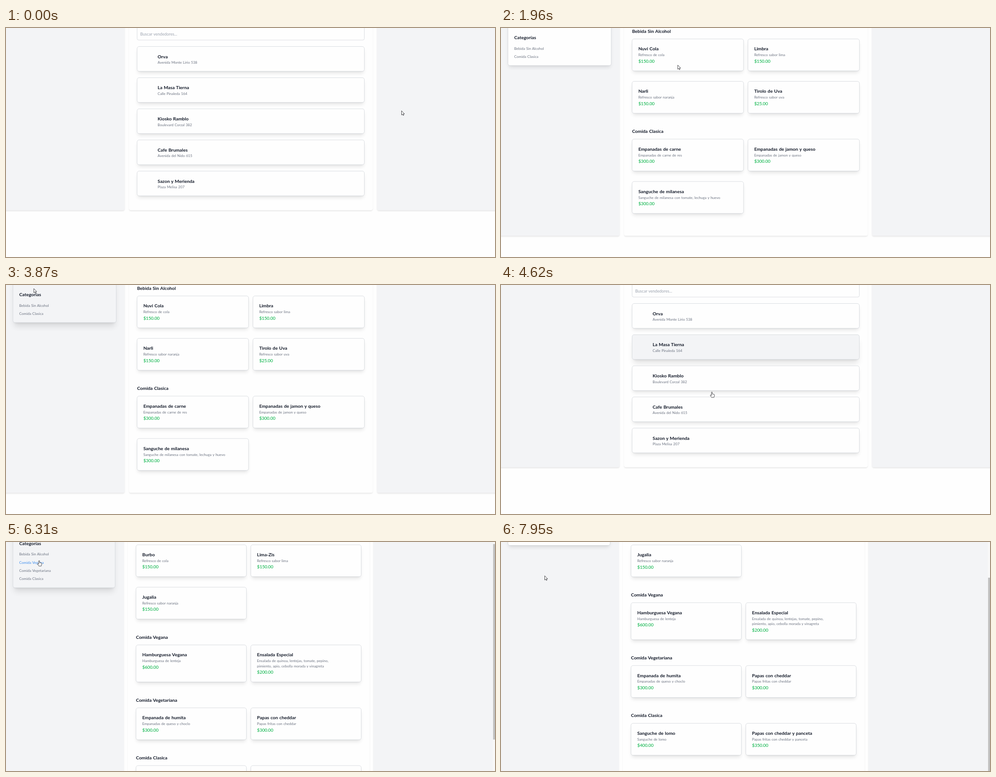
Animation, 1091 px wide and 513 px high, one loop 8 s. Source, as an HTML page:

```html
<!DOCTYPE html>
<html lang="es">
<head>
<meta charset="utf-8">
<title>Vendedores</title>
<style>
  html, body { margin: 0; width: 100%; height: 100%; overflow: hidden; background: #fefefe; }
  svg { display: block; width: 1091px; height: 513px; }
  text { font-family: Lato, "Open Sans", sans-serif; word-spacing: .06em; white-space: pre; }
  .title { font-size: 10.3px; font-weight: 700; fill: #111827; }
  .price { font-size: 10.2px; font-weight: 600; fill: #22bb5b; letter-spacing: -.025em; }
  .note { font-size: 8px; fill: #6b7280; }
  .hint { font-size: 9.1px; fill: #9ca3af; }
  .link { fill: #3b8cee; }
  .face { fill: #fefefe; stroke: #d5d8dd; stroke-width: .9px; }
  .lift, .over .rest { visibility: hidden; }
  .over .lift { visibility: inherit; }
  .over .face { fill: #f3f4f6; }
</style>
</head>
<body>
<svg id="stage" viewBox="0 0 1091 513" xmlns="http://www.w3.org/2000/svg"></svg>
<script>
const LOOP = 8000, STEP = 68, ROW = 69.75, LINE = 18.3;
const $ = id => document.getElementById(id);

const rect = (x, y, w, h, r, attrs) =>
  `<rect x="${x}" y="${y}" width="${w}" height="${h}" rx="${r}" ${attrs}/>`;
const label = (kind, x, y, s) => `<text class="${kind}" x="${x}" y="${y}">${s}</text>`;
const shade = (x, y, w, h, dy, blur, inset) =>
  rect(x + inset, y + inset + dy, w - 2 * inset, h - 2 * inset, 4,
    `opacity=".1" style="filter:blur(${blur}px)"`);

function card(x, y, w, h, id = '') {
  const soft = (...layer) => shade(x, y, w, h, ...layer);
  const lift = id && `<g class="lift">${soft(11.4, 7.1, 2.8)}${soft(4.5, 2.8, 3.4)}</g>`;
  return `<g id="${id}"><g class="rest">${soft(5.7, 4.25, 1.7)}${soft(2.3, 1.7, 2.3)}</g>` +
    lift + rect(x, y, w, h, 4.5, 'class="face"') + '</g>';
}

// Three page columns: gray side panels around a white one
function panels(left, mid, midEnd, right, bottom) {
  const col = (x, end, fill) => shade(x, -60, end - x, bottom + 60, 2.3, 1.7, .6) +
    rect(x, -60, end - x, bottom + 60, 4.5, `fill="${fill}"`);
  return col(-20, left, '#f3f4f6') + col(mid, midEnd, '#fefefe') + col(right, 1111, '#f3f4f6');
}

function product(x, y, w, h, [title, notes, price]) {
  const lines = notes.split('|');
  return card(x, y, w, h) + label('title', x + 14, y + 25.8, title) +
    lines.map((s, i) => label('note', x + 14, y + 38.6 + i * 11.4, s)).join('') +
    label('price', x + 14, y + 41.6 + lines.length * 11.6, price);
}

// Sections flow downwards, two cards per row
function products(x, w, sections) {
  let out = '', y = 10.7;
  for (const [heading, items] of sections) {
    out += label('title', x, y, heading);
    y += 13.8;
    for (let i = 0; i < items.length; i += 2) {
      const row = items.slice(i, i + 2);
      const h = row.some(item => item[1].includes('|')) ? 83 : 71.5;
      out += row.map((item, j) => product(x + j * (w + 9.7), y, w, h, item)).join('');
      y += h + 23.5;
    }
    y += 20.6;
  }
  return out;
}

const menuBottom = sections => 47.5 + LINE * sections.length;

const categories = (id, w, sections) =>
  card(15.5, -14, w, menuBottom(sections) + 14, id + 'Card') +
  label('title', 29.5, 25, 'Categorías') + `<g id="${id}Links">` +
  sections.map(([s], i) => label('note', 29.5, 48.6 + i * LINE, s)).join('') + '</g>';

const vendors = [
  ['Orva', 'Avenida Monte Lirio 538'],
  ['La Masa Tierna', 'Calle Pinaleda 164'],
  ['Kiosko Ramblo', 'Boulevard Corzal 382'],
  ['Cafe Brumales', 'Avenida del Nido 615'],
  ['Sazon y Merienda', 'Plaza Melisa 207']
];
const shortMenu = [
  ['Bebida Sin Alcohol', [
    ['Nuvi Cola', 'Refresco de cola', '$150.00'],
    ['Limbra', 'Refresco sabor lima', '$150.00'],
    ['Narli', 'Refresco sabor naranja', '$150.00'],
    ['Tirolo de Uva', 'Refresco sabor uva', '$25.00']]],
  ['Comida Clasica', [
    ['Empanadas de carne', 'Empanadas de carne de res', '$300.00'],
    ['Empanadas de jamon y queso', 'Empanadas de jamon y queso', '$300.00'],
    ['Sanguche de milanesa', 'Sanguche de milanesa con tomate, lechuga y huevo', '$300.00']]]
];
const longMenu = [
  ['Bebida Sin Alcohol', [
    ['Burbo', 'Refresco de cola', '$150.00'],
    ['Lima-Zis', 'Refresco sabor lima', '$150.00'],
    ['Jugalia', 'Refresco sabor naranja', '$150.00']]],
  ['Comida Vegana', [
    ['Hamburguesa Vegana', 'Hamburguesa de lenteja', '$600.00'],
    ['Ensalada Especial',
      'Ensalada de quinoa, lentejas, tomate, pepino,|pimiento, apio, cebolla morada y vinagreta', '$200.00']]],
  ['Comida Vegetariana', [
    ['Empanada de humita', 'Empanadas de queso y choclo', '$300.00'],
    ['Papas con cheddar', 'Papas fritas con cheddar', '$300.00']]],
  ['Comida Clasica', [
    ['Sanguche de lomo', 'Sanguche de lomo', '$400.00'],
    ['Papas con cheddar y panceta', 'Papas fritas con cheddar y panceta', '$350.00']]]
];

const vendorTop = i => 41.5 + i * ROW;
const vendorCards = vendors.map(([name, street], i) =>
  card(292.5, vendorTop(i), 507, 55.5, 'vendor' + i) +
  label('title', 338.3, vendorTop(i) + 26, name) +
  label('note', 338.3, vendorTop(i) + 38.7, street)).join('');

const ink = 'fill="#fff" stroke="#26262b" stroke-width=".85" stroke-linejoin="round"';
$('stage').innerHTML =
  `<g id="list">${panels(265, 274.3, 818.3, 827.5, 408.3)}` +
  rect(292.5, -10, 507, 37, 3.5, 'class="face"') +
  label('hint', 299.5, 16.8, 'Buscar vendedores...') + vendorCards + '</g>' +
  `<g id="short">${panels(265, 274.3, 818.3, 827.5, 465.5)}` +
  categories('short', 230.5, shortMenu) + products(292.4, 248.8, shortMenu) + '</g>' +
  `<g id="long"><g id="page">${panels(263, 271.5, 811.5, 819.5, 700)}` +
  categories('long', 228, longMenu) + products(290, 246.4, longMenu) + '</g>' +
  rect(1086, 0, 5, 513, 0, 'fill="#f8f8f8"') +
  '<rect id="thumb" x="1086.7" width="4.3" height="438" fill="#c1c1c1"/></g>' +
  `<g id="cursor"><path id="arrow" ${ink} d="M0 0V9.4L2.2 7.4 3.6 10.5 5.1 9.9 3.7 6.9H6.6Z"/>` +
  `<path id="hand" ${ink} d="M-1 1.2a1 1 0 0 1 2 0V4.7L4.8 5.5Q6 5.8 5.9 7L5.2 10.3 4.6 12.4H-.6L-3.5 8.3Q-3.9 7 -2.8 6.8L-1 8Z"/></g>`;

// Pointer moves: each curves from the previous end, bent by an optional control point
const moves = [
  { from: 120, to: 480, end: [548, 58], bend: [700, 80] },
  { from: 750, to: 1430, end: [518.5, 74.5], bend: [497, 90] },
  { from: 1630, to: 2370, end: [219, 66], bend: [370, 95] },
  { from: 2440, to: 2440, end: [216, 68] },
  { from: 2640, to: 3400, end: [111.5, 58], bend: [226, 103] },
  { from: 3470, to: 3870, end: [62, 8], bend: [75, 75] },
  { from: 4270, to: 4960, end: [440, 146], bend: [659, 392] },
  { from: 5090, to: 5840, end: [84, 68], bend: [316, 257] },
  { from: 5900, to: 6310, end: [74, 41.5], scroll: 18.3 },
  { from: 6510, to: 6650, end: [74.5, 48.7] },
  { from: 6980, to: 7120, end: [74.5, 48.7], scroll: 113 },
  { from: 7330, to: 7470, end: [81.5, 59.5] },
  { from: 7800, to: 7950, end: [97.5, 75.7] }
];

// The screen refreshes in steps while the pointer moves
function progress({ from, to }, t) {
  const n = Math.round((to - from) / STEP);
  const k = n ? Math.floor((t - from) / (to - from) * n + 1e-6) : 0;
  return Math.min(1, (k + 1) / (n + 1));
}

function pose(t) {
  let at = [882.5, 185.5], scroll = 0;
  for (const m of moves) {
    if (t < m.from) break;
    const u = progress(m, t), v = 1 - u;
    at = at.map((a, i) => {
      const b = m.end[i], c = m.bend ? m.bend[i] : (a + b) / 2;
      return v * v * a + 2 * u * v * c + u * u * b;
    });
    if (m.scroll) scroll += (m.scroll - scroll) * u;
  }
  return [...at, scroll];
}

const show = (id, on) => $(id).setAttribute('visibility', on ? 'inherit' : 'hidden');
const over = (id, on) => $(id).classList.toggle('over', on);

// Hovers the category card and its links; true when on a link
function hoverMenu(id, right, sections, x, y) {
  const inside = x > 15 && x < right && y < menuBottom(sections);
  over(id + 'Card', inside);
  return [...$(id + 'Links').children].map((link, i) => {
    const on = inside && x > 29 && x < 96 && Math.abs(y - 45.6 - i * LINE) < 6;
    link.classList.toggle('link', on);
    return on;
  }).includes(true);
}

function draw(t) {
  const [x, y, scroll] = pose(t);
  const screen = t >= 5090 ? 'long' : t >= 1630 && t < 4270 ? 'short' : 'list';
  for (const id of ['list', 'short', 'long']) show(id, id === screen);

  let hand = false;
  if (screen === 'list') {
    hand = t > 4480;
    vendors.forEach((_, i) => {
      const inside = x > 292 && x < 800 && Math.abs(y - vendorTop(i) - 27.7) < 27.7;
      over('vendor' + i, hand ? i === 1 : inside);
    });
  } else if (screen === 'short') {
    hand = hoverMenu('short', 246, shortMenu, x, y);
  } else {
    hand = hoverMenu('long', 243.5, longMenu, x, y + scroll);
    $('page').setAttribute('transform', `translate(0 ${-scroll})`);
    $('thumb').setAttribute('y', -10 + scroll * .796);
  }
  show('arrow', !hand);
  show('hand', hand);
  $('cursor').setAttribute('transform', `translate(${x} ${y})`);
}

const start = performance.now();
function tick() {
  draw((performance.now() - start) % LOOP);
  requestAnimationFrame(tick);
}
tick();
</script>
</body>
</html>
```
